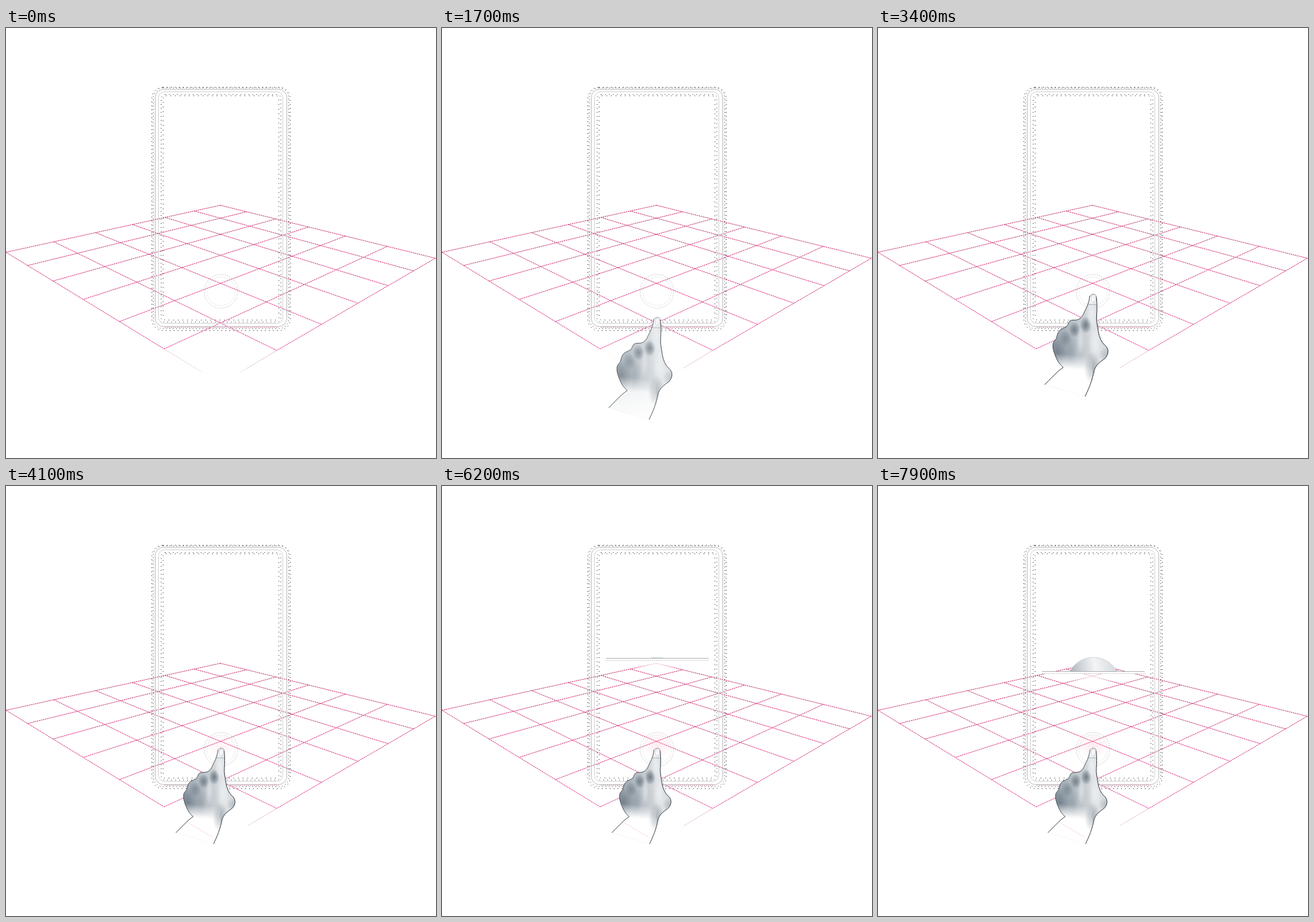
These frames come from a looping animation (650x650 px, 8 s). An HTML page with a canvas:

```html
<!DOCTYPE html>
<html lang="en">
<head>
<meta charset="utf-8">
<title>Tablet and hand</title>
<style>
html, body { margin: 0; width: 100%; height: 100%; overflow: hidden; background: #fff; }
canvas { display: block; width: 650px; height: 650px; }
</style>
</head>
<body>
<canvas id="stage" width="650" height="650"></canvas>
<script>
const ctx = document.getElementById('stage').getContext('2d');
const LOOP = 8000, STEP = 100;
const clamp = v => Math.max(0, Math.min(1, v));
const ramp = (t, a, b) => clamp((t - a) / (b - a));

// Floor corners with projective weights: back, left, front, right
const corners = [[324, 268, .719], [0, 339, .5], [324, 537, .281], [649, 348, .5]];

function project(u, v) {
  const k = [(1 - u) * (1 - v), u * (1 - v), u * v, (1 - u) * v];
  let x = 0, y = 0, w = 0;
  corners.forEach(([cx, cy, cw], i) => {
    const f = k[i] * cw;
    x += f * cx; y += f * cy; w += f;
  });
  return [x / w, y / w];
}

function line(a, b, color, dash = [], width = 1) {
  ctx.beginPath();
  ctx.moveTo(a[0], a[1]);
  ctx.lineTo(b[0], b[1]);
  ctx.strokeStyle = color;
  ctx.lineWidth = width;
  ctx.setLineDash(dash);
  ctx.stroke();
  ctx.setLineDash([]);
}

function frame(x0, y0, x1, y1, r, color, dash = []) {
  ctx.beginPath();
  ctx.roundRect(x0, y0, x1 - x0, y1 - y0, r);
  ctx.strokeStyle = color;
  ctx.lineWidth = 1;
  ctx.setLineDash(dash);
  ctx.stroke();
  ctx.setLineDash([]);
}

function ring(x, y, r, color, dash) {
  ctx.beginPath();
  ctx.arc(x, y, r, 0, Math.PI * 2);
  ctx.strokeStyle = color;
  ctx.lineWidth = 1;
  ctx.setLineDash(dash);
  ctx.stroke();
  ctx.setLineDash([]);
}

function blob(x, y, rx, ry, rgb, alpha) {
  ctx.save();
  ctx.translate(x, y);
  ctx.scale(rx, ry);
  const g = ctx.createRadialGradient(0, 0, 0, 0, 0, 1);
  g.addColorStop(0, `rgba(${rgb},${alpha})`);
  g.addColorStop(.5, `rgba(${rgb},${alpha * .6})`);
  g.addColorStop(1, `rgba(${rgb},0)`);
  ctx.fillStyle = g;
  ctx.fillRect(-1, -1, 2, 2);
  ctx.restore();
}

function linear(x0, y0, x1, y1, ...stops) {
  const g = ctx.createLinearGradient(x0, y0, x1, y1);
  stops.forEach(([p, c]) => g.addColorStop(p, c));
  return g;
}

function drawFloor(hand) {
  const pink = linear(0, 268, 0, 500, [0, '#bd2563'], [.5, '#d21c70'], [1, '#e0288c']);
  const dash = [2, 1];
  for (let i = 0; i <= 6; i++) {
    const s = i / 6, end = i === 6 ? 5 / 6 : 1;
    line(project(s, 0), project(s, end), pink, dash);
    line(project(0, s), project(end, s), pink, dash);
  }
  // The nearest edges fade out, and more so under the hand
  const tail = linear(0, 485, 0, 521, [0, '#d978a8'], [1, '#c9b8c0']);
  ctx.save();
  ctx.beginPath();
  ctx.rect(0, 480, 650, 41);
  ctx.clip();
  ctx.globalAlpha = 1 - hand;
  line(project(1, 5 / 6), project(1, 1), tail, [1, 2]);
  line([365, 514], project(1, 1), tail, [1, 2]);
  ctx.globalAlpha = 1;
  line(project(5 / 6, 1), [365, 514], tail, [1, 1]);
  ctx.restore();
}

function drawTablet() {
  frame(220.5, 89.5, 429.5, 457.5, 17, '#111', [1, 5]);
  frame(222.5, 90.5, 427.5, 454.5, 15, '#333', [1, 4]);
  frame(225.5, 92.5, 424.5, 451.5, 13, '#bcbcbc');
  frame(230.5, 96.5, 418.5, 446.5, 9, '#d4d4d4');
  frame(234.5, 100.5, 415.5, 444.5, 6, '#333', [1, 5]);
  frame(237.5, 102.5, 412.5, 441.5, 4, '#222', [1, 6]);
  line([240, 452.5], [412, 452.5], '#e3a3c2', [2, 1]);
}

function drawButton(press) {
  if (press) blob(325, 392, 24, 20, '255,190,205', .3 * press);
  ring(325, 398, 25.5, '#aaa', [1, 2]);
  ring(325, 398, 21.5, '#ccc', [1, 2]);
}

function drawScan(t) {
  const show = ramp(t, 5400, 5900);
  if (!show) return;
  const y = Math.round(261 + (t - 6200) * 20 / 1700);
  ctx.save();
  ctx.globalAlpha = show;
  blob(325, y + 8, 48, 12, '255,255,255', .75);
  ctx.save();
  ctx.beginPath();
  ctx.rect(240, 240, 170, y - 240);
  ctx.clip();
  ctx.beginPath();
  ctx.arc(325.5, 299, 40, 0, Math.PI * 2);
  ctx.fillStyle = linear(288, 285, 356, 272,
    [0, '#a4abb3'], [.25, '#c9ced3'], [.6, '#f3f4f5'], [1, '#d9dde1']);
  ctx.fill();
  ctx.strokeStyle = '#c2c7cc';
  ctx.lineWidth = .7;
  ctx.stroke();
  ctx.restore();
  ctx.fillStyle = '#fff';
  ctx.fillRect(248, y, 155, 3);
  line([248, y - .5], [403, y - .5], '#b4b4b4');
  line([248, y + 2.5], [403, y + 2.5], '#ccc', [2, 1]);
  ctx.restore();
}

// Outlines relative to the fingertip, x then y
const leftSide = [-5, 3, -6, 11, -9, 19, -13, 27, -17, 36, -25, 40, -33, 39, -37, 43,
  -39, 50, -49, 53, -54, 60, -55, 68, -60, 72, -61, 80, -59, 88, -56, 96, -52, 104, -45, 111];
const rightSide = [5, 4, 6, 14, 6, 26, 5, 38, 7, 50, 9, 63, 14, 74, 21, 80, 23, 86,
  22, 92, 18, 98, 13, 101, 6, 107, 2, 114, 1, 120];
const armLeft = [-45, 111, -52, 116, -62, 126, -73, 137];
const armRight = [1, 120, -2, 131, -6, 142, -12, 155];

// Smooth curve through the midpoints of the given points
function trace(p) {
  for (let i = 0; i < p.length - 2; i += 2)
    ctx.quadraticCurveTo(p[i], p[i + 1], (p[i] + p[i + 2]) / 2, (p[i + 1] + p[i + 3]) / 2);
  ctx.lineTo(p[p.length - 2], p[p.length - 1]);
}

function reversed(p) {
  const out = [];
  for (let i = p.length - 2; i >= 0; i -= 2) out.push(p[i], p[i + 1]);
  return out;
}

function edge(p, color, width) {
  ctx.beginPath();
  ctx.moveTo(p[0], p[1]);
  trace(p);
  ctx.strokeStyle = color;
  ctx.lineWidth = width;
  ctx.stroke();
}

function drawHand(t, alpha) {
  if (!alpha) return;
  const tip = t < 3400 ? 437 - 27 * Math.max(0, t - 2100) / 1000
    : 402 - 6 * ramp(t, 3400, 4000);
  const size = 1 - .065 * ramp(t, 3400, 4000);
  ctx.save();
  ctx.globalAlpha = alpha;
  ctx.translate(325, tip);
  ctx.scale(size, size);

  ctx.save();
  ctx.beginPath();
  ctx.moveTo(0, 0);
  trace(rightSide);
  trace(armRight);
  ctx.lineTo(-73, 137);
  trace(reversed(armLeft));
  trace(reversed(leftSide));
  ctx.closePath();
  ctx.fillStyle = '#fff';
  ctx.fill();
  ctx.clip();

  ctx.fillStyle = linear(-61, 85, 24, 70,
    [0, '#98a3ac'], [.35, '#b3bbc2'], [.62, '#ccd1d5'], [.8, '#e2e5e7'], [1, '#cdd2d6']);
  ctx.fillRect(-75, 0, 100, 158);
  blob(-11, 47, 9, 13, '82,97,109', .75);
  blob(-28, 54, 9, 12, '82,97,109', .65);
  blob(-42, 67, 10, 13, '90,105,117', .5);
  blob(-54, 88, 16, 24, '96,111,123', .65);
  blob(-35, 86, 12, 26, '110,124,135', .35);
  blob(-19, 70, 6, 22, '240,243,245', .5);
  blob(-2, 30, 8, 22, '238,241,243', .7);
  blob(2, 75, 9, 26, '244,246,247', .6);
  blob(-1, 8, 10, 11, '255,255,255', .9);
  blob(20, 92, 12, 12, '130,142,151', .35);

  ctx.fillStyle = linear(-22, 93, -24, 115, [0, 'rgba(255,255,255,0)'], [1, '#fff']);
  ctx.fillRect(-75, 90, 74, 70);
  ctx.fillStyle = linear(0, 106, 0, 148, [0, 'rgba(255,255,255,0)'], [1, '#fff']);
  ctx.fillRect(-75, 104, 100, 54);
  blob(-1, 112, 13, 24, '125,137,147', .45);
  line([-7, 16], [5, 16], '#a5adb4');
  ctx.beginPath();
  ctx.ellipse(1, 7, 4, 6, .1, 0, Math.PI * 2);
  ctx.strokeStyle = '#bbc2c8';
  ctx.lineWidth = .7;
  ctx.stroke();
  const through = .25 * ramp(t, 3400, 4000);
  if (through) line([-53, 121], [-14, 144], `rgba(235,90,150,${through})`);
  ctx.restore();

  ctx.beginPath();
  ctx.moveTo(-5, 4);
  ctx.quadraticCurveTo(-3, 0, 1, 0);
  ctx.quadraticCurveTo(4, 0, 5, 4);
  ctx.strokeStyle = '#858d94';
  ctx.lineWidth = .9;
  ctx.stroke();
  edge(leftSide, '#39434b', .9);
  edge(rightSide, '#30383f', 1);
  edge(armLeft, '#2c3136', .9);
  edge(armRight, '#25292d', .9);
  ctx.restore();
}

function draw(t) {
  const hand = ramp(t, 400, 2000);
  ctx.fillStyle = '#fff';
  ctx.fillRect(0, 0, 650, 650);
  drawFloor(hand);
  drawTablet();
  drawButton(ramp(t, 3400, 4500));
  drawScan(t);
  drawHand(t, hand);
}

const start = performance.now();
function tick() {
  let t = (performance.now() - start) % LOOP;
  t = Math.floor(t / STEP) * STEP;
  if (t > 4900 && t < 5500) t = 4900;
  draw(t);
  requestAnimationFrame(tick);
}
tick();
</script>
</body>
</html>
```
